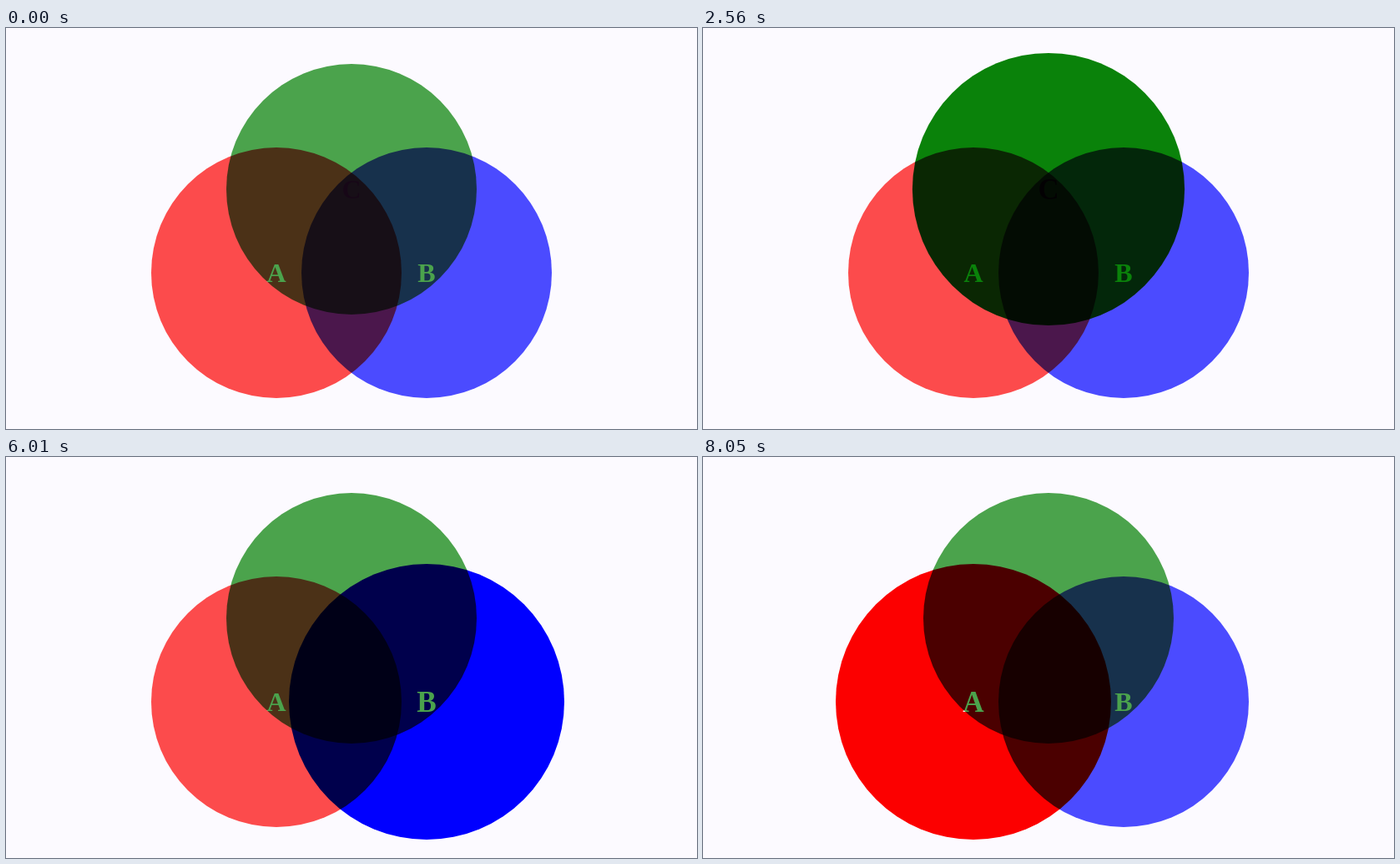
Write an HTML page with a canvas that moves like this. It is 828x480 px and loops after 8500 ms.

```html
<!DOCTYPE html>
<html lang="en">
<head>
<meta charset="utf-8">
<title>Three circles</title>
<style>
  html, body { margin: 0; width: 100%; height: 100%; overflow: hidden; background: #fcfaff; }
  canvas { display: block; }
</style>
</head>
<body>
<canvas id="stage" width="828" height="480"></canvas>
<script>
const LOOP = 8500;
const RADIUS = 150;
const stage = document.getElementById('stage');
const ctx = stage.getContext('2d');
const layer = document.createElement('canvas');
layer.width = stage.width;
layer.height = stage.height;
const layerCtx = layer.getContext('2d');

// Each move is [start ms, target highlight 0..1, duration ms].
const circles = [
  { label: 'A', x: 324, y: 293, fill: '#f00', ink: '#fff',
    moves: [[6732, 1, 600]] },
  { label: 'B', x: 504, y: 293, fill: '#00f', ink: '#fff',
    moves: [[3955, 1, 750], [4890, 0, 800], [5420, 1, 600], [6732, 0, 600]] },
  { label: 'C', x: 414, y: 193, fill: '#008000', ink: '#000',
    moves: [[10, 1, 800], [1270, 0, 800], [2035, 1, 900], [3955, 0, 750]] }
];

// The CSS "ease" curve: cubic-bezier(.25, .1, .25, 1).
function ease(p) {
  if (p <= 0) return 0;
  if (p >= 1) return 1;
  const bezier = (a, b, u) => 3 * a * u * (1 - u) ** 2 + 3 * b * u * u * (1 - u) + u ** 3;
  let lo = 0, hi = 1;
  for (let i = 0; i < 24; i++) {
    const mid = (lo + hi) / 2;
    if (bezier(0.25, 0.25, mid) < p) lo = mid; else hi = mid;
  }
  return bezier(0.1, 1, lo);
}

// A move that is interrupted hands its current value to the next one.
function highlight(moves, t) {
  let value = 0;
  moves.forEach(([start, target, duration], i) => {
    if (t < start) return;
    const next = moves[i + 1];
    const until = next ? Math.min(t, next[0]) : t;
    value += (target - value) * ease((until - start) / duration);
  });
  return value;
}

function drawCircle(circle, t) {
  const level = highlight(circle.moves, t);
  const scale = 1 + 0.1 * level;

  layerCtx.setTransform(1, 0, 0, 1, 0, 0);
  layerCtx.clearRect(0, 0, layer.width, layer.height);
  layerCtx.setTransform(scale, 0, 0, scale, circle.x, circle.y);
  layerCtx.fillStyle = circle.fill;
  layerCtx.beginPath();
  layerCtx.arc(0, 0, RADIUS, 0, Math.PI * 2);
  layerCtx.fill();

  layerCtx.fillStyle = circle.ink;
  layerCtx.font = 'bold 32px "Liberation Serif", serif';
  layerCtx.textAlign = 'center';
  layerCtx.fillText(circle.label, 0, 11);

  ctx.globalAlpha = 0.7 + 0.3 * level;
  ctx.drawImage(layer, 0, 0);
}

function draw(t) {
  ctx.globalCompositeOperation = 'source-over';
  ctx.globalAlpha = 1;
  ctx.fillStyle = '#fcfaff';
  ctx.fillRect(0, 0, stage.width, stage.height);
  ctx.globalCompositeOperation = 'multiply';
  circles.forEach(circle => drawCircle(circle, t));
}

const began = performance.now();
function tick() {
  draw((performance.now() - began) % LOOP);
  requestAnimationFrame(tick);
}
tick();
</script>
</body>
</html>
```
